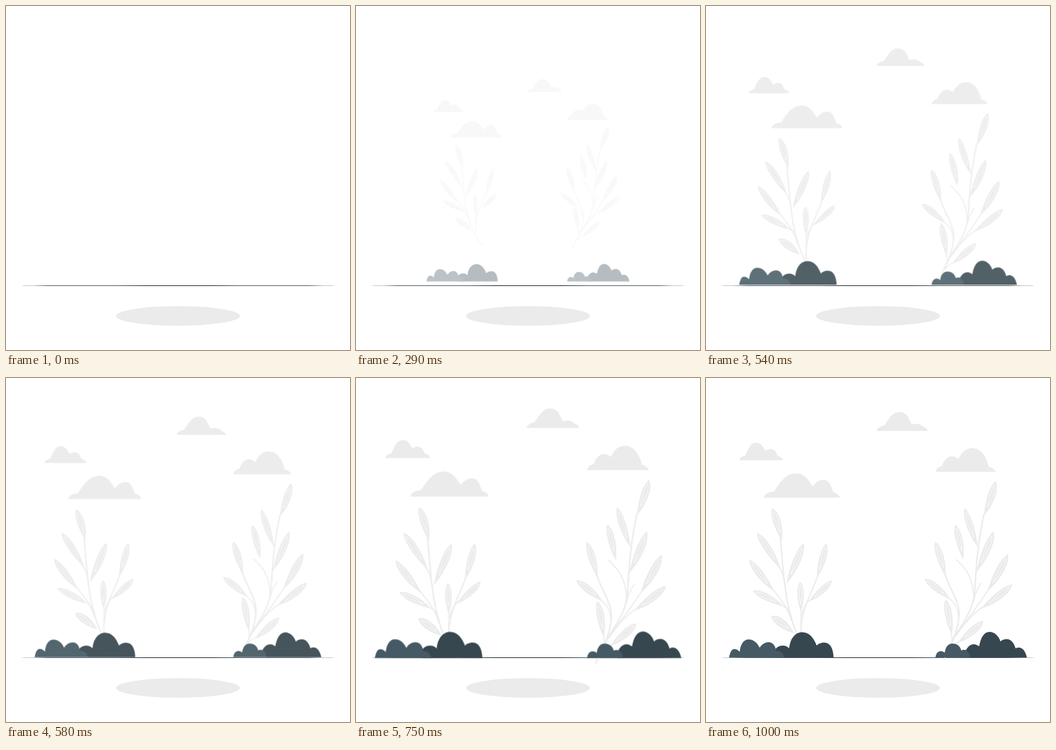
An HTML page that plays this animation: 500x500 px, repeating every 1.04 s.

```html
<!DOCTYPE html>
<html lang="en">
<head>
<meta charset="utf-8">
<title>Garden zoom in</title>
<style>
  html, body { margin: 0; width: 100%; height: 100%; overflow: hidden; background: #fff; }
  svg { display: block; width: 100vw; height: 100vh; }
  #air { fill: #ebebeb; transform-origin: 250px 228px; }
  #bushes { fill: #37474f; transform-origin: 250px 387.5px; }
  .light { fill: #455a64; }
  .stem { fill: none; stroke: #ebebeb; stroke-linecap: round; }
  .vein { fill: none; stroke: #fff; stroke-width: .7; }
</style>
</head>
<body>
<svg viewBox="0 0 500 500">
  <ellipse cx="250" cy="450.5" rx="90" ry="14.3" fill="#ebebeb"/>
  <ellipse cx="250" cy="406.6" rx="228" ry=".5" fill="#263238"/>
  <g id="air">
    <path d="M48 119.5C50 115 53 113.500 57 113C61 104 64 94 73 94C81 94 83 101 87 106C91 102 98 102 101 107L104 113C108 114 111 116 112 119.500Z"/>
    <path d="M84 174C85 168 92 165 99 165C106 154 115 138.500 131 138.500C144 138.500 150 150 155 157.500C160 151 165 148 171 148C180 148 183 160 185 166C190 167 194 170 194.500 174Z"/>
    <path d="M248 77C249 72 254 70 259 69C266 60 270 49.500 281 49.500C293 49.500 295 60 299 67.500C306 65 313 67 316 71C320 72 322 74 322 77Z"/>
    <path d="M333.500 136.500C335 131 338 129 343 128C345 120 351 114 357 114C362 114 364 116 367 118C371 108 378 102 387 102C400 102 408 115 411 129C416 130 420 133 421 136.500Z"/>
    <g id="plants"></g>
  </g>
  <g id="bushes">
    <path d="M101 406.500V394C103 391 107 389 112 389C116 389 119 391 121 393C122 380 129 369.500 140 369.500C151 369.500 157 379 161 389C163 386 168 384.500 172 384.500C181 384.500 185 394 185.500 406.500Z"/>
    <path class="light" d="M33.500 406.500C35 399 37 394 41 394C45 394 47 396 49 398C50 388 54 380 62 380C70 380 75 386 78 392C81 387 86 384 91 384C97 384 101 389 102 397C108 396 112 400 114 406.500Z"/>
    <path d="M377 406.500V397C380 391 384 387 389 387C393 387 395 389 397 390C399 378 404 369 412 369C420 369 426 376 428 383C430 381 433 379.500 437 379.500C444 379.500 448 386 450 393C457 389 464 394 466.500 406.500Z"/>
    <path class="light" d="M333.500 406.500C334 401 337 397 341 397C344 397 346 398 347 399.500C348 391 352 386 358 386C366 386 370 391 371 396C378 393 383 398 384 406.500Z"/>
  </g>
</svg>
<script>
const plants = document.getElementById('plants');

function addPath(d, cls, width) {
  const el = document.createElementNS('http://www.w3.org/2000/svg', 'path');
  el.setAttribute('d', d);
  if (cls) el.setAttribute('class', cls);
  if (width) el.setAttribute('stroke-width', width);
  plants.append(el);
}

// Teardrop from base to tip: h is half the width, bend bows it sideways.
function leaf(tipX, tipY, baseX, baseY, h, bend = 0) {
  const dx = tipX - baseX, dy = tipY - baseY, len = Math.hypot(dx, dy);
  const at = (u, v) =>
    `${(baseX + dx * u - dy / len * v).toFixed(1)} ${(baseY + dy * u + dx / len * v).toFixed(1)}`;
  const shape = (from, to, k) =>
    `M${at(from, bend * .6 * (from > 0))}` +
    `C${at(from + .3 * (to - from), k + bend)} ${at(from + .8 * (to - from), 1.6 * k + bend)} ${at(to, 0)}` +
    `C${at(from + .8 * (to - from), bend - 1.6 * k)} ${at(from + .3 * (to - from), bend - k)} ` +
    `${at(from, bend * .6 * (from > 0))}Z`;
  addPath(shape(0, 1, h));
  addPath(shape(.24, .9, h * .45), 'vein');
}

const stems = [
  ['M108 232C111 262 112 285 115 304C119 340 130 380 153 403', 2],
  ['M105 273C111 281 114 291 115 302', 1.6],
  ['M97 307C108 321 119 334 124 352', 1.6],
  ['M112 331C119 334 123 342 125 350', 1.4],
  ['M162 288C156 310 136 335 138 378', 1.8],
  ['M151 323C145 327 141 335 139 345', 1.4],
  ['M138 336V362', 1.4],
  ['M404 198C398 225 394 255 392 288C391 325 386 337 372 359C358 380 352 394 346 409', 2],
  ['M393 280L391 294', 1.6],
  ['M364 264C378 277 388 290 389 316', 1.6],
  ['M400 298C394 306 391 315 389 324', 1.4],
  ['M347 284C355 311 372 326 367 353C365 368 359 380 355 390', 2],
  ['M353 320C361 326 367 336 367 348', 1.5],
  ['M411 307C398 327 384 347 362 374', 1.6],
  ['M402 333C388 342 374 359 364 374', 1.5],
  ['M357 370L358 384', 1.5],
  ['M371 382C364 384 358 388 354 394', 1.4]
];
stems.forEach(([d, width]) => addPath(d, 'stem', width));

const leaves = [
  [96, 189, 110, 236, 5.5, 1.5], [74, 225, 108, 277, 5.3, 1],
  [142, 240, 117, 299, 5.5, 1], [63, 264, 99, 310, 5.3, -1],
  [68, 309, 113, 332, 5, 1], [95, 346, 128, 371, 6, 1],
  [175, 240, 161, 291, 5, 1], [137, 296, 138, 340, 4.7, 0],
  [183, 294, 149, 325, 4.7, 1.5],
  [421, 150, 404, 200, 5.5, 1.5], [376, 189, 395, 246, 5, -1],
  [418, 223, 393, 282, 5.5, 1.5], [362, 213, 374, 264, 5, 1],
  [333, 238, 348, 288, 5.2, 1], [439, 256, 409, 310, 5.8, 1.5],
  [318, 292, 355, 322, 5.2, 1], [445, 300, 400, 335, 5.5, 1.5],
  [348, 322, 357, 373, 5.3, 1], [403, 353, 366, 385, 5.5, 1]
];
leaves.forEach(l => leaf(...l));

const LOOP = 1040, STEP = 1000 / 24, LEAD = 28;
const zooms = ['air', 'bushes'].map(id => {
  const zoom = document.getElementById(id).animate(
    [{ opacity: 0, transform: 'scale(.5)' }, { opacity: 1, transform: 'scale(1)' }],
    { duration: 1000, fill: 'both', easing: 'cubic-bezier(.36, -.01, .5, 1.38)' }
  );
  zoom.pause();
  return zoom;
});

const start = performance.now();
function draw() {
  const t = (performance.now() - start) % LOOP;
  // Steps of 1/24 s, with boundaries rounded to 10 ms.
  const step = Math.min(24, Math.floor((t + 5) / STEP));
  const time = step < 3 ? 0 : Math.min(1000, step * STEP + LEAD);
  zooms.forEach(zoom => { zoom.currentTime = time; });
  requestAnimationFrame(draw);
}
draw();
</script>
</body>
</html>
```
